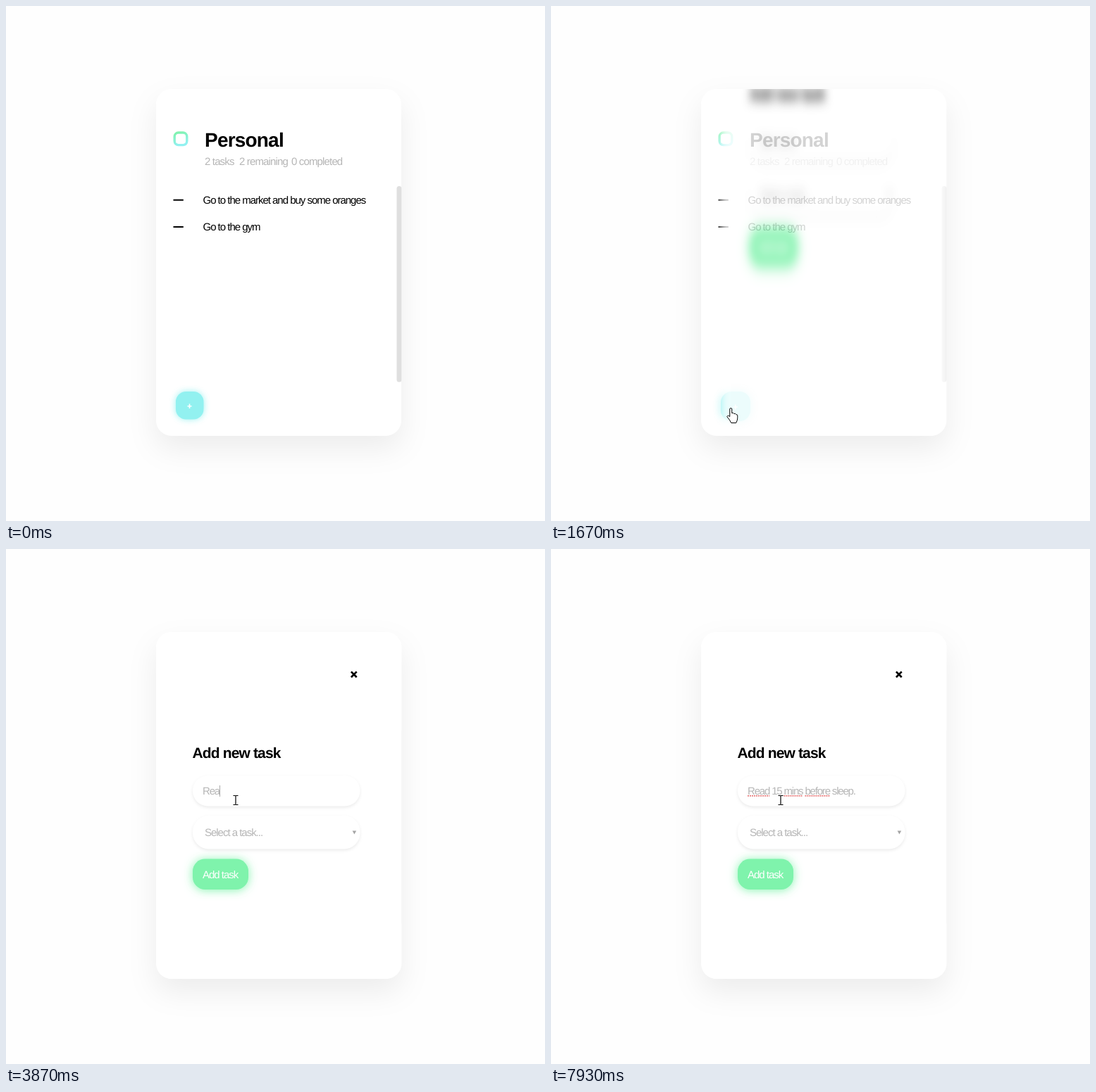
These frames come from a looping animation (765x732 px, 8000 ms). An HTML page:

```html
<!DOCTYPE html>
<html lang="en">
<head>
<meta charset="utf-8">
<title>Task list</title>
<style>
  html, body { margin: 0; width: 100%; height: 100%; overflow: hidden; background: #fefefe; }
  svg { display: block; width: 765px; height: 732px; }
  text { font: 15px "Liberation Sans", Arial, sans-serif; letter-spacing: -1.02px; text-rendering: geometricPrecision; white-space: pre; }
  .grey { fill: #b6b6b6; }
  .sub { letter-spacing: -.85px; }
  .entry { letter-spacing: -1.18px; }
  .list-title { font-size: 28px; font-weight: 700; letter-spacing: -.8px; }
  .form-title { font-size: 21px; font-weight: 700; letter-spacing: -.86px; }
  .card { filter: drop-shadow(0 18px 20px rgba(0,0,0,.07)); }
  .field { fill: #fff; filter: drop-shadow(0 2px 2px rgba(0,0,0,.08)); }
  .cyan { fill: #92f1f0; filter: drop-shadow(0 0 5px rgba(146,241,240,.9)); }
  .green { fill: #7ff3ac; filter: drop-shadow(0 1px 7px rgba(127,243,172,.95)); }
  .pointer { fill: #fff; stroke: #000; stroke-linejoin: round; }
</style>
</head>
<body>
<svg viewBox="0 0 765 732">
  <defs>
    <linearGradient id="ring" x1="0" y1="0" x2=".3" y2="1">
      <stop offset="0" stop-color="#7ff3ac"/><stop offset="1" stop-color="#92f1f0"/>
    </linearGradient>
    <clipPath id="inside"><rect x="213" y="118" width="348.5" height="493" rx="22"/></clipPath>
  </defs>
  <rect class="card" x="213" y="118" width="348" height="493" rx="22" fill="#fff"/>

  <g clip-path="url(#inside)">
    <rect x="239.2" y="180" width="17.6" height="17.6" rx="5.5" fill="none" stroke="url(#ring)" stroke-width="3.4"/>
    <text class="list-title" x="282" y="199.5">Personal</text>
    <g class="grey">
      <text class="sub" x="282" y="225.5">2 tasks</text>
      <text class="sub" x="331" y="225.5">2 remaining</text>
      <text class="sub" x="405" y="225.5">0 completed</text>
    </g>
    <path d="M237.5 275.8h14.3M237.5 314h14.3" stroke="#000" stroke-width="2"/>
    <text x="279.5" y="280.5">Go to the market and buy some oranges</text>
    <text x="279.5" y="318.8">Go to the gym</text>
    <rect x="554.5" y="256" width="7" height="278.5" rx="3.5" fill="#dfdfdf"/>
    <g id="plus">
      <rect class="cyan" x="241" y="548" width="39.5" height="39.5" rx="14.5"/>
      <path d="M257.5 568.7h6M260.5 565.5v6.4" stroke="#fff" stroke-width="1.6"/>
    </g>

    <g id="form">
      <rect x="217" y="-40" width="375" height="840" fill="#fff"/>
      <path d="M489.9 174.4l7.8 7.8M497.7 174.4l-7.8 7.8" stroke="#000" stroke-width="2.7"/>
      <text class="form-title" x="264.5" y="296.8">Add new task</text>
      <rect class="field" x="265" y="322" width="237.5" height="43.5" rx="21.7"/>
      <text id="hint" class="grey entry" x="279" y="349">Task name</text>
      <text id="entry" class="grey entry" x="279" y="349"></text>
      <path id="spelling" stroke="#e04848" stroke-width="1.2" stroke-dasharray="2 1"/>
      <path id="caret" stroke="#a8a8a8" d="M.5 336v16"/>
      <rect class="field" x="265" y="379" width="237.5" height="47.5" rx="23"/>
      <text class="grey" x="282" y="408.3">Select a task...</text>
      <path d="M491.6 400.5h5.6l-2.8 5z" fill="#a5a5a5"/>
      <g id="add">
        <rect class="green" x="265" y="440.5" width="79" height="43.5" rx="17.5"/>
        <text x="279" y="467.6" fill="#fff">Add task</text>
      </g>
    </g>
  </g>

  <g id="cursor">
    <path id="arrow" class="pointer" d="M.5 .5V15.5L4 12.3 6.4 17.4 8.7 16.4 6.4 11.3H10.8Z"/>
    <path id="hand" class="pointer" d="M-2 1.5Q-2 0-.5 0T1 1.5V7Q3 6 4 8Q6 7 7 9Q9 9 9 11V14Q9 17 7 21H0Q-1 18-6 12Q-5 9-2 12Z"/>
    <path id="beam" fill="none" stroke="#000" stroke-width="1.2" d="M-3.5-6.5H-1L0-6 1-6.5H3.5M0-6V6M-3.5 6.5H-1L0 6 1 6.5H3.5"/>
  </g>
</svg>
<script>
const LOOP = 8000, FPS = 15, TEXT_X = 279;
const FOCUS = 2600, BLINK = 520;

const $ = id => document.getElementById(id);
const clamp = v => Math.min(1, Math.max(0, v));
const ramp = (t, a, b) => clamp((t - a) / (b - a));
const mix = (a, b, k) => a + (b - a) * k;
const easeOut = (k, power) => 1 - (1 - k) ** power;
const show = (node, on) => node.style.display = on ? '' : 'none';

// Typing comes in bursts; the typist speeds up near the end.
const bursts = [
  { at: 3330, keys: 'Re' }, { at: 3870, keys: 'ad 1' }, { at: 4600, keys: '5 ' }, { at: 5070, keys: 'm' },
  { at: 5600, keys: 'ins ' }, { at: 6270, keys: 'bef' }, { at: 6670, keys: 'ore sle' }, { at: 7270, keys: 'ep.' },
];
const keyGap = at => at < 6600 ? 130 : 65;

// Pointer moves, each from wherever the last one ended.
const moves = [
  { from: 330, to: 600, x: 232, y: 558, bendX: 2, bendY: 2 },
  { from: 870, to: 1070, x: 240, y: 577, bendX: 1, bendY: 1 },
  { from: 1070, to: 1330, x: 255, y: 573, bendX: 1, bendY: 1 },
  { from: 1670, to: 2600, x: 326, y: 357, bendX: 6, bendY: 3.7 },
];

// cubic-bezier(.23, 1, .32, 1)
function swoop(x) {
  let lo = 0, hi = 1;
  for (let i = 0; i < 24; i++) {
    const s = (lo + hi) / 2, r = 1 - s;
    if (.69 * r * r * s + .96 * r * s * s + s * s * s < x) lo = s; else hi = s;
  }
  return easeOut(lo, 3);
}

function drawForm(t) {
  const p = swoop(ramp(t, 1500, 2100)), form = $('form');
  const originY = 118 + 246.5 * p;
  show(form, t >= 1520);
  form.setAttribute('transform',
    `translate(387 ${originY - 900 * (1 - p)}) scale(${mix(.2, 1, p)} ${mix(2.5, 1, p)}) translate(-387 ${-originY})`);
  form.style.opacity = p;
  form.style.filter = p > .998 ? 'none' : `blur(${40 * (1 - p)}px)`;
}

function drawEntry(t) {
  let typed = '', touched = FOCUS;
  for (const { at, keys } of bursts) {
    if (t < at) break;
    const last = Math.min(keys.length - 1, Math.floor((t - at) / keyGap(at)));
    typed += keys.slice(0, last + 1);
    touched = at + last * keyGap(at);
  }
  const entry = $('entry');
  entry.textContent = typed;
  show($('hint'), !typed);

  const xAt = n => TEXT_X + (n ? entry.getSubStringLength(0, n) : 0);
  const finished = [...typed.matchAll(/[a-z]{4,}(?= )/gi)];
  $('spelling').setAttribute('d', finished
    .map(word => `M${xAt(word.index)} 350.8H${xAt(word.index + word[0].length)}`).join(''));

  show($('caret'), t >= FOCUS && t - touched < BLINK);
  $('caret').setAttribute('transform', `translate(${Math.round(xAt(typed.length))} 0)`);
}

function drawCursor(t) {
  let x = 654, y = 633;
  for (const move of moves) {
    const k = ramp(t, move.from, move.to);
    x = mix(x, move.x, easeOut(k, move.bendX));
    y = mix(y, move.y, easeOut(k, move.bendY));
  }
  const kind = t < 1260 ? 'arrow' : y > 428 ? 'hand' : y > 366 ? 'arrow' : 'beam';
  for (const id of ['arrow', 'hand', 'beam']) show($(id), id === kind);
  show($('cursor'), t >= 330);
  $('cursor').setAttribute('transform', `translate(${x} ${y})`);
}

const grow = (id, x, y, s) =>
  $(id).setAttribute('transform', `translate(${x} ${y}) scale(${s}) translate(${-x} ${-y})`);

function draw(ms) {
  // The picture advances in steps of one fifteenth of a second.
  const t = Math.floor((ms % LOOP) * FPS / 1000 + .08) * 1000 / FPS + 5;
  grow('plus', 241, 548, 1 + .063 * ramp(t, 1220, 1335));
  grow('add', 265, 440, 1 + .07 * (ramp(t, 1790, 1865) - ramp(t, 1920, 2050)));
  drawForm(t);
  drawEntry(t);
  drawCursor(t);
}

const began = performance.now();
function tick() {
  draw(performance.now() - began);
  requestAnimationFrame(tick);
}
tick();
</script>
</body>
</html>
```
